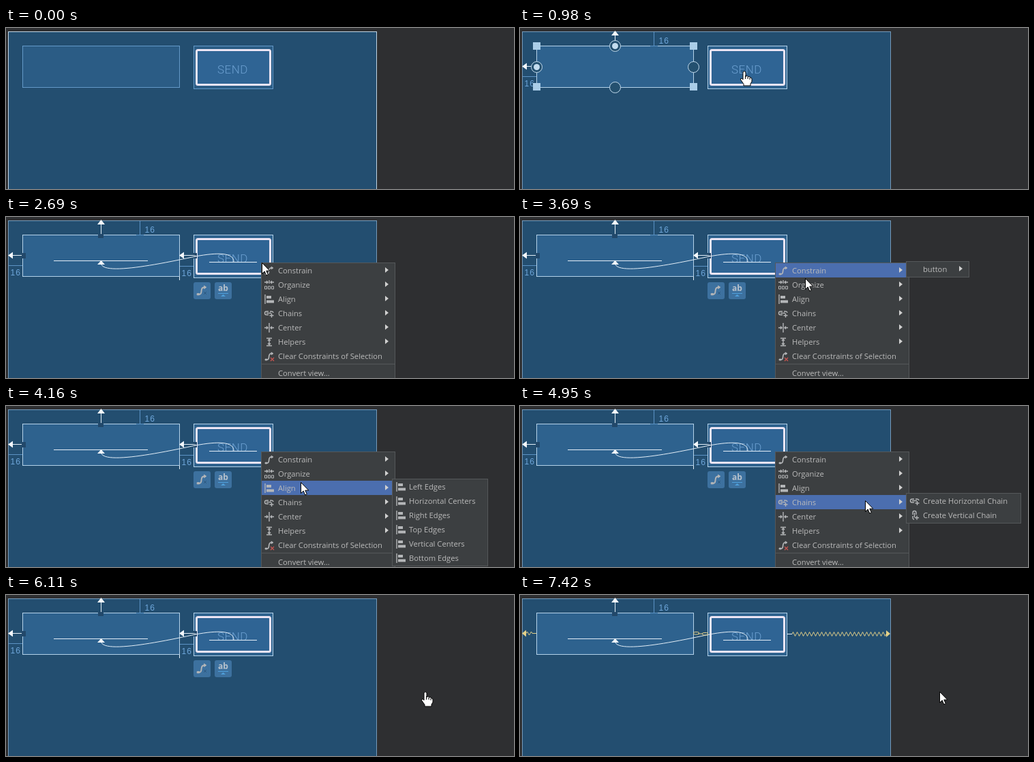
Recreate the animation shown at these times as an HTML page. Size 745 by 237 pixels, loop 8000 ms.

```html
<!DOCTYPE html>
<html lang="en">
<meta charset="utf-8">
<title>Creating a horizontal chain</title>
<style>
  html, body { margin: 0; width: 100%; height: 100%; overflow: hidden; background: #2e2f31; }
  svg { display: block; }
  .line { fill: none; stroke: #e4eff8; }
  .white { fill: #f4f8fc; }
  .blue { fill: none; stroke: #5c93c5; }
  .margin { font: 12px "Liberation Sans", sans-serif; letter-spacing: 1px; fill: #6fa7db; }
  .widget { fill: #2b5c85; stroke: #6499c8; }
  .widget.on { fill: #2e628e; stroke: #b4d2ea; }
  .panel { fill: #3c3f41; stroke: #55585a; }
  .mark { fill: #4b6eaf; }
  .item { font: 11.2px "Open Sans", sans-serif; fill: #bbb; }
  .icon { fill: none; stroke: #b4b6b8; stroke-width: 1.4; }
  .chain { fill: none; stroke: #e3d088; }
  .pointer { fill: #fff; stroke: #000; stroke-linejoin: round; }
</style>
<svg width="745" height="237" viewBox="0 0 745 237">
  <defs>
    <g id="curve" class="icon"><path d="M-5 5h2C2 5-3-4 3-4h2" stroke-width="1.7"/><path d="M-6 4h3v2h-3zM3-6l3 2-3 2z" fill="#b4b6b8" stroke-width=".7"/></g>
    <g id="organize" class="icon"><path d="M-7-4h5m4 0h5M-4-6l2 2-2 2M4-6l-2 2 2 2M0-7v5"/><path d="M-6.500 2h3v4h-3zM-1.500 2h3v4h-3zM3.500 2h3v4h-3z" stroke-width="1"/></g>
    <g id="align" class="icon"><path d="M-6-7V7"/><path d="M-4-3H3M-4 3.500H7" stroke-width="4"/></g>
    <g id="link" class="icon"><path d="M-1 2h-3a2.500 2.500 0 0 1 0-5h3M1-3h2a2.500 2.500 0 0 1 3 2M-4-.5H3M3.500 0v6M.5 3h6"/></g>
    <g id="linkdown" class="icon"><use href="#link" transform="matrix(0 1 1 0 0 0)"/></g>
    <g id="center" class="icon"><path d="M0-7V7M-7 0h5m4 0h5M-4-2l2 2-2 2M4-2L2 0l2 2"/></g>
    <g id="helpers" class="icon"><path d="M-4-5.500h8M-4 5.500h8M0-3v6M-2-2l2-2 2 2M-2 2l2 2 2-2"/></g>
    <g id="clear"><use href="#curve"/><path d="M2 2l5 5m0-5l-5 5" stroke="#c75450" stroke-width="1.300"/></g>
  </defs>

  <rect id="surface" x="3.500" y="5.500" width="540" height="240" fill="#234e70"/>
  <rect id="field" class="widget" x="24.500" y="26.500" width="230" height="61"/>
  <rect id="button" class="widget" x="275.500" y="26.500" width="116" height="63"/>
  <rect x="279.500" y="32.500" width="108" height="51" rx="2" fill="#2f6494" stroke="#ece5f4" stroke-width="3"/>
  <text x="310" y="66.500" font-family="Roboto, sans-serif" font-size="17" font-weight="300" letter-spacing=".5" fill="#6b9fd0">SEND</text>

  <g id="top">
    <path class="blue" d="M196.500 6V26M191 26.500h11"/>
    <text class="margin" x="203.500" y="23">16</text>
    <path class="line" d="M139.500 8V26"/><path class="white" d="M134 11l5.500-7 5.500 7z"/>
  </g>
  <g id="left">
    <path class="blue" d="M4 71.500H24"/>
    <text class="margin" x="6.500" y="86">16</text>
    <path class="line" d="M8 56.500H24"/><path class="white" d="M10 51.500L3 56.500l7 5z"/>
  </g>
  <g id="handles" fill="#24506f" stroke="#c4dcee"></g>
  <path id="topAnchor" d="M135 25h8v6h-8z" fill="#22486a"/>
  <g id="multi">
    <path d="M23 53h6v8h-6zM274 53h6v8h-6z" fill="#22486a"/>
    <path class="blue" d="M255 72.500h20"/>
    <text class="margin" x="257.500" y="87">16</text>
    <path class="line" d="M260 56.500h15l4 1M254.500 88v5"/><path class="white" d="M261 51.500l-7 5 7 5z"/>
    <rect x="275" y="96" width="25" height="25" rx="3" fill="#3d719f"/>
    <rect x="306" y="96" width="25" height="25" rx="3" fill="#3d719f"/>
    <use href="#curve" transform="translate(287 108) scale(1.150)"/>
    <path d="M290 110l4 4m0-4l-4 4" stroke="#2c587f"/>
    <text x="318.500" y="109" text-anchor="middle" font-family="Open Sans, sans-serif" font-size="12" font-weight="700" fill="#b9c3cd">ab</text>
    <path d="M311 112.500h15" stroke="#4fa0dc"/><path d="M315 117l3.500-3 3.500 3z" fill="#4fa0dc"/>
  </g>
  <g id="baseline">
    <path class="line" d="M70 64.500H208M298 66.500h70M139.500 68C140 88 240 66 278 58C310 52 334 52 334 66"/>
    <path class="white" d="M134 70l5.500-6 5.500 6z"/>
  </g>
  <g id="chain" class="chain">
    <path id="springs"/>
    <path d="M9 51.500L3 56.500l6 5zM537 52l6 5-6 5z" fill="#e3d088" stroke="none"/>
    <rect x="254.500" y="54.500" width="8" height="3.500" rx="2"/><path d="M261 57h7"/><rect x="267.500" y="55.500" width="8" height="3.500" rx="2"/>
    <path class="line" d="M392 57.500h7"/>
  </g>

  <g id="menu"></g>
  <g id="cursor">
    <circle id="click" r="12" fill="#ff0" fill-opacity=".47"/>
    <path id="arrow" class="pointer" d="M.5.5V16.500l3.700-3.500 2.500 6 2.600-1.100-2.500-5.700h5z"/>
    <g id="hand"><path class="pointer" d="M-2 2Q0-1 2 2V8l2.500-.3 1 1 2.500 0 1 1.300 1.500.5.5 2V16l-2 3v3H-1v-2.500L-5.500 13q-.3-2.500 2-1.500L-2 13z"/>
      <path d="M1.500 7v5M5 9v3M8 10v3" stroke="#000"/></g>
  </g>
</svg>
<script>
const LOOP = 8000;
const $ = id => document.getElementById(id);
const show = (id, on) => $(id).setAttribute('display', on ? 'inline' : 'none');
const within = (t, a, b) => t >= a && t < b;

// Resize handles around the text field
$('handles').innerHTML =
  [[19, 21], [249, 21], [19, 81], [249, 81]].map(([x, y]) =>
    `<rect x="${x}" y="${y}" width="11" height="11" fill="#aacde8" stroke="none"/>`).join('') +
  [[139.5, 26.5, 1], [24.5, 57.5, 1], [139.5, 87.5], [254.5, 57.5]].map(([x, y, linked]) =>
    `<circle cx="${x}" cy="${y}" r="8"/>` +
    (linked ? `<circle cx="${x}" cy="${y}" r="4.5" fill="#c4dcee" stroke="none"/>` : '')).join('');

const zigzag = (x, y, count, half, amp) =>
  `M${x} ${y}` + Array.from({length: count}, (_, i) => `l${half / 2} ${i % 2 ? amp : -amp}l${half / 2} ${i % 2 ? -amp : amp}`).join('');
$('springs').setAttribute('d', zigzag(9, 56.5, 3, 3, 2.5) + 'H24' + zigzag(399, 57.5, 46, 3, 3));

const ROW = 21;
const label = (x, y, text) => `<text class="item" x="${x}" y="${y + 4}">${text}</text>`;
const icon = (name, x, y) => `<use href="#${name}" x="${x}" y="${y}"/>`;
const more = (x, y) => `<path d="M${x} ${y - 5}l5 4-5 4z" fill="#d0d0d0"/>`;
const panel = (x, y, w, h) => `<rect class="panel" x="${x + .5}" y="${y + .5}" width="${w - 1}" height="${h - 1}"/>`;
const submenu = (id, y, w, items, extra = '') =>
  `<g id="${id}">` + panel(566, y, w, items.length * ROW + 3) + extra +
  items.map(([name, text], i) => {
    const mid = y + 12 + i * ROW;
    return (name ? icon(name, 579, mid) : '') + label(591, mid, text);
  }).join('') + '</g>';

const entries = [['curve', 'Constrain'], ['organize', 'Organize'], ['align', 'Align'], ['link', 'Chains'],
  ['center', 'Center'], ['helpers', 'Helpers'], ['clear', 'Clear Constraints of Selection']];
const alignments = ['Left Edges', 'Horizontal Centers', 'Right Edges', 'Top Edges', 'Vertical Centers', 'Bottom Edges'];

$('menu').innerHTML = panel(374, 67, 197, 180) +
  `<rect id="row" class="mark" x="375" width="195" height="${ROW}"/>` +
  entries.map(([name, text], i) => {
    const y = 79 + i * ROW;
    return icon(name, 386, y) + label(399, y, text) + (i < 6 ? more(556, y) : '');
  }).join('') +
  '<path d="M375 216.500h195" stroke="#55585a"/>' + label(399, 230, 'Convert view...') +
  submenu('constrainMenu', 65, 93, [['', 'button']], more(644, 77)) +
  submenu('alignMenu', 107, 141, alignments.map(text => ['align', text])) +
  submenu('chainMenu', 128, 169, [['link', 'Create Horizontal Chain'], ['linkdown', 'Create Vertical Chain']],
    `<rect id="choice" class="mark" x="567" y="129" width="167" height="${ROW}"/>`);

// Pointer moves: first step, last step, number of steps, end point
const moves = [
  [210, 600, 6, 215, 58], [826, 980, 3, 329, 63], [1060, 1360, 5, 375, 67],
  [3380, 3690, 5, 418, 90], [3760, 3840, 2, 432, 112], [4170, 4400, 4, 482, 136],
  [4950, 4950, 1, 506, 139], [5030, 5350, 5, 615, 142]];

function pointerAt(t) {
  let x = 410, y = 241;
  for (const [start, end, steps, toX, toY] of moves) {
    if (t < start) break;
    const step = t >= end ? steps : 1 + Math.floor((t - start) / (end - start) * (steps - 1) + .03);
    x += (toX - x) * step / steps;
    y += (toY - y) * step / steps;
  }
  return [Math.round(x), Math.round(y)];
}

function draw(t) {
  const [x, y] = pointerAt(t);
  const selected = t >= 750, both = t >= 1830, chained = t >= 7340;
  const onField = t >= 210 && x < 255 && y < 88;
  const onButton = within(x, 275, 392) && y < 90;

  $('surface').setAttribute('stroke', selected ? '#759bbb' : '#c0d5e6');
  $('field').classList.toggle('on', selected || onField);
  $('button').classList.toggle('on', both || onButton);
  show('top', selected);
  show('left', selected && !chained);
  show('handles', selected && !both);
  show('topAnchor', both);
  show('multi', both && !chained);
  show('baseline', both);
  show('chain', chained);

  const row = Math.floor((y - 69.5) / ROW);
  show('menu', within(t, 2610, 6110));
  show('row', row >= 0);
  $('row').setAttribute('y', 68 + row * ROW);
  show('constrainMenu', within(t, 3610, 3760));
  show('alignMenu', within(t, 4090, 4400));
  show('chainMenu', within(t, 4630, 6110));
  show('choice', x > 567);

  const hand = onField && t < 2610 || within(t, 750, 2610) || within(t, 6110, 7420);
  show('cursor', t >= 210);
  $('cursor').setAttribute('transform', `translate(${x} ${y})`);
  show('hand', hand);
  show('arrow', !hand);
  show('click', within(t, 600, 750) || within(t, 1760, 1830) || within(t, 2460, 2610) || within(t, 5960, 6110));
}

function tick() {
  draw(performance.now() % LOOP);
  requestAnimationFrame(tick);
}
tick();
</script>
</html>
```
